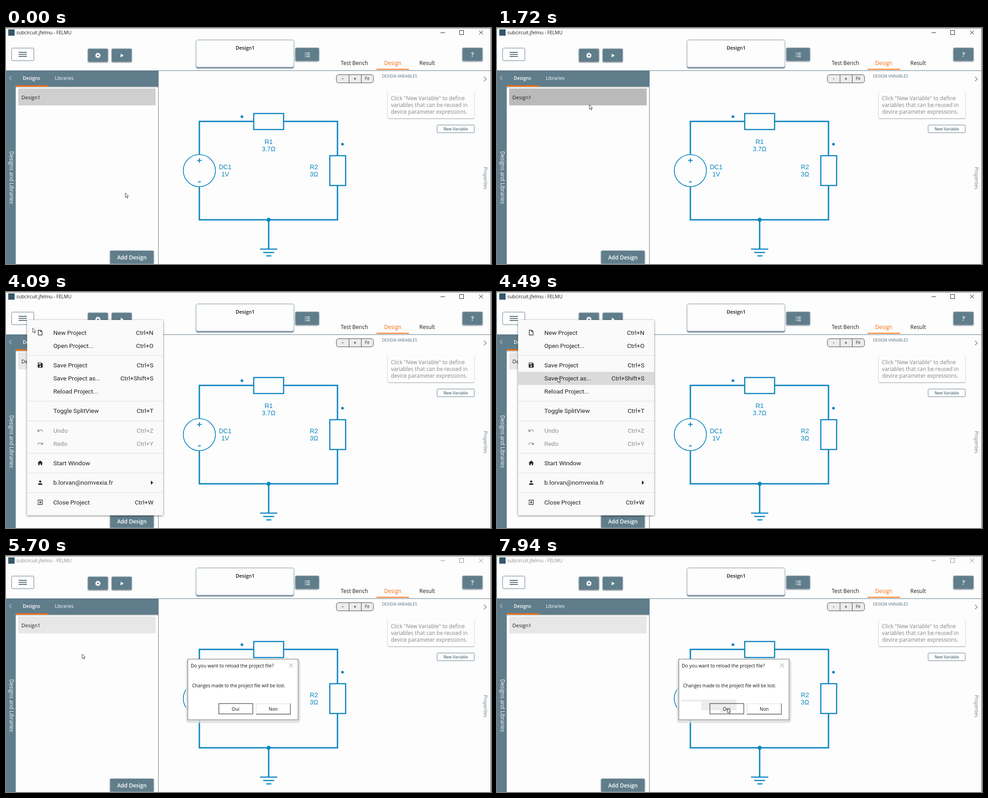
Recreate the animation shown at these times as an HTML page. Size 1071x523 px, loop 8 s.

```html
<!DOCTYPE html>
<html lang="en">
<head>
<meta charset="utf-8">
<title>Circuit editor</title>
<style>
html, body { margin: 0; width: 100%; height: 100%; overflow: hidden; background: #fdfdfd; }
svg { display: block; width: 1071px; height: 523px; }
text { font-family: "Open Sans", "Noto Sans", sans-serif; fill: #1c1c1c; white-space: pre; }
.mid { text-anchor: middle; }
.end { text-anchor: end; }
.semi { font-weight: 600; }
.med { font-weight: 500; }
.light { fill: #fff; }
.slate { fill: #607d8b; }
.raised { fill: #607d8b; stroke: #90a4ae; filter: drop-shadow(0 1px 1px #0007); }
.outline { fill: #fff; stroke: #607d8b; }
.wire { fill: none; stroke: #0a84c1; stroke-width: 3; }
.node { fill: #0a84c1; }
.label text { font: 14px "Liberation Sans", Arial, sans-serif; fill: #0a84c1; text-anchor: middle; }
.hint text { font-size: 11.9px; fill: #858585; }
#menu text { font: 13.6px Roboto, sans-serif; fill: #212121; }
#menu text.off { fill: #8f8f8f; }
#dialog text { fill: #111; }
#arrow, #hand { fill: #fff; stroke: #333; stroke-width: .9; stroke-linejoin: round; }
</style>
</head>
<body>
<svg viewBox="0 0 1071 523">
  <!-- title bar -->
  <rect x="5" y="3" width="14" height="14" fill="#34586b"/>
  <g id="title">
    <text x="23" y="14.2" font-size="10.3">subcircuit.jfelmu - FELMU</text>
    <path d="M959.5 10.5h10M1001.5 5.5h9v9h-9zM1044.5 5.5l9 9m0-9l-9 9" fill="none" stroke="#222"/>
  </g>

  <!-- toolbar -->
  <rect class="outline" x="12.5" y="44.5" width="49" height="28" rx="2"/>
  <rect id="hover" x="13" y="45" width="48" height="27" rx="2" fill="#e0e6e9"/>
  <path d="M28 54h18m-18 4.5h18m-18 4.5h18" stroke="#546e7a" stroke-width="2"/>
  <rect class="raised" x="181" y="46" width="44" height="29" rx="2"/>
  <rect class="raised" x="233.5" y="46" width="44" height="29" rx="2"/>
  <rect class="raised" x="639" y="44" width="52" height="29" rx="2"/>
  <rect class="raised" x="1008" y="44" width="44" height="29" rx="2"/>
  <g fill="none" stroke="#fff">
    <circle cx="203" cy="60.8" r="3.4" stroke-width="2.8"/>
    <circle cx="203" cy="60.8" r="5.3" stroke-width="1.8" pathLength="32" stroke-dasharray="2 2"/>
    <path d="M660 55.5h11m-11 4h11m-11 4h11" stroke-width="1.5" stroke-dasharray="2 1.5 7.5 0"/>
  </g>
  <path d="M253 57l7 4l-7 4z" fill="#fff"/>
  <text class="mid light semi" x="1030" y="64" font-size="14.5">?</text>
  <rect x="419.5" y="26.5" width="216.5" height="63" rx="4" fill="#90a4ae" stroke="#78909c"/>
  <rect x="420" y="27" width="215.5" height="59" rx="3" fill="#fdfdfd"/>
  <text class="mid semi" x="528" y="48" font-size="11">Design1</text>
  <text class="mid med" x="769.5" y="82" font-size="12">Test Bench</text>
  <text class="mid med" x="854" y="82" font-size="12" style="fill:#f26a0f">Design</text>
  <text class="mid med" x="930" y="82" font-size="12">Result</text>
  <path d="M818 91.5h72" stroke="#f26a0f" stroke-width="2"/>

  <!-- side panel -->
  <path d="M336 94.5H1071M336.5 94V523" stroke="#607d8b"/>
  <path d="M0 94H336.5V130H21.5V523H0z" class="slate"/>
  <rect x="21.5" y="130" width="315" height="2" opacity=".22"/>
  <rect x="21.5" y="127" width="71.5" height="3" fill="#f26a0f"/>
  <path d="M12 106.5l-4.5 4.5l4.5 4.5" fill="none" stroke="#a9bbc4" stroke-width="1.5"/>
  <text class="light semi" x="37" y="114.8" font-size="10.2">Designs</text>
  <text class="light med" x="108" y="114.8" font-size="10.3">Libraries</text>
  <rect id="row" x="27" y="134" width="303.5" height="37.5"/>
  <text x="34" y="157.5" font-size="11.2">Design1</text>
  <text class="light" font-size="11.7" transform="translate(7.5 273) rotate(90)">Designs and Libraries</text>
  <rect class="raised" x="230" y="493.5" width="96" height="29" rx="2"/>
  <text class="mid light semi" x="278" y="513" font-size="12">Add Design</text>

  <!-- circuit -->
  <g class="wire">
    <path d="M427 280V207H547M613 207H732V283M732 349V425H427V351M580 425V490"/>
    <path d="M547 189.5h66v35.5h-66zM715 283h35v66h-35z" stroke-width="2.6"/>
    <circle cx="427" cy="316" r="35.5" stroke-width="1.7"/>
    <path d="M422 293.5h10m-5-5v10M424 341h6" stroke-width="2"/>
    <path d="M561 490h38M568 497.5h24M575 505h11" stroke-width="2.5"/>
  </g>
  <g class="node">
    <circle cx="521" cy="196.5" r="3"/>
    <circle cx="743" cy="257.5" r="3"/>
    <circle cx="580" cy="425" r="4.5"/>
  </g>
  <g class="label">
    <text x="580" y="256.5">R1</text><text x="580" y="273">3.7Ω</text>
    <text x="484" y="313">DC1</text><text x="484" y="329">1V</text>
    <text x="680" y="313">R2</text><text x="680" y="329">3Ω</text>
  </g>

  <!-- zoom and properties -->
  <rect x="729.5" y="103.5" width="82" height="18" rx="5" fill="#ececec" stroke="#444"/>
  <path d="M757.5 103v18m27-18v18" stroke="#444"/>
  <text class="mid semi" x="743.5" y="115.5" font-size="10">-</text>
  <text class="mid semi" x="770.5" y="115.5" font-size="10">+</text>
  <text class="mid" x="797.5" y="115" font-size="9">Fit</text>
  <text class="med" x="830" y="109.6" font-size="8.8" style="fill:#546e7a">DESIGN VARIABLES</text>
  <path d="M1055.5 108l5 5l-5 5" fill="none" stroke="#78909c" stroke-width="1.6"/>
  <path d="M843 141v57q0 2 2 2h187q2 0 2-2v-57" fill="#fdfdfd" style="filter:drop-shadow(0 1px 1px #0006)"/>
  <g class="hint">
    <text x="850" y="160">Click "New Variable" to define</text>
    <text x="850" y="175">variables that can be reused in</text>
    <text x="850" y="190">device parameter expressions.</text>
  </g>
  <rect class="outline" x="952" y="215" width="82" height="17" rx="1.5"/>
  <text class="mid semi" x="993" y="226.5" font-size="8.5" style="fill:#546e7a">New Variable</text>
  <text font-size="10.3" transform="translate(1054.5 308) rotate(90)" style="fill:#607d8b">Properties</text>
  <path d="M0 .5H1071" stroke="#777"/>
  <path d="M1070.5 0V523" stroke="#444"/>

  <g id="menu">
    <rect x="46.5" y="62" width="300.5" height="433" rx="2" fill="#fafafa" style="filter:drop-shadow(0 1px 2px #0008)"/>
    <rect id="mark" x="47" width="300" height="29" fill="#dadada"/>
    <path d="M320 418l5 4.5l-5 4.5z" fill="#212121"/>
  </g>

  <g id="dialog">
    <rect x="397" y="229" width="253" height="141" rx="6" fill="#dedede" opacity=".8"/>
    <rect x="401.5" y="228.5" width="243.5" height="134.5" fill="#fff" stroke="#666"/>
    <g id="shade" fill="#ededed">
      <rect x="407" y="318" width="52" height="5"/>
      <rect x="451" y="318" width="78" height="24"/>
      <rect x="492" y="342" width="24" height="6"/>
    </g>
    <text x="408" y="246.5" font-size="10.35">Do you want to reload the project file?</text>
    <path d="M625 238l9 9m0-9l-9 9" stroke="#888"/>
    <text x="411" y="290.5" font-size="10">Changes made to the project file will be lost.</text>
    <rect x="470" y="327" width="75" height="23" fill="none" stroke="#555" stroke-width="1.4"/>
    <path d="M552.5 350v-22.5h75.5" fill="none" stroke="#d8d8d8"/>
    <path d="M552 350.5h76v-23.5" fill="none" stroke="#555" stroke-width="1.3"/>
    <text class="mid" x="507" y="342.5" font-size="10.2">Oui</text>
    <text class="mid" x="590" y="342.5" font-size="10.2">Non</text>
  </g>

  <g id="pointer">
    <path id="arrow" d="M0 0v10l2.3-2l1.7 3.6l1.6-.7l-1.6-3.5h3z"/>
    <path id="hand" d="M-1.5 1q1.5-2 3 0v4l4 1q2 .5 1.5 3l-1 4.500h-6l-4-5q0-2 2.500-.5z"/>
  </g>
</svg>

<script>
const LOOP = 8000, STEP = 125;
const $ = id => document.getElementById(id);

// 24-unit icon outlines
const ICONS = {
  file: "M4 2h10l6 6v14H4zM6 4v16h12V9h-5V4z",
  save: "M3 3h14l4 4v14H3zM5 5v4h10V5zM9 16a3 3 0 1 0 6 0a3 3 0 1 0-6 0z",
  undo: "M2 7v9h9l-3.6-3.6Q16 6 20 16l2.4-.8Q17 3 5.6 10.6z",
  home: "M10 20v-6h4v6h5v-8h3l-10-9l-10 9h3v8z",
  user: "M8 8a4 4 0 1 0 8 0a4 4 0 1 0-8 0zM4 20v-2q1-4 8-4t8 4v2z",
  exit: "M3 3h18v18H3v-6h2v4h14V5H5v4H3zM3 11h9.7L10 8.400l1.500-1.400l5 5l-5 5L10 15.600l2.700-2.600H3z"
};

// centre y, label, shortcut, icon
const ITEMS = [
  [90, "New Project", "Ctrl+N", "file"],
  [119, "Open Project...", "Ctrl+O"],
  [162, "Save Project", "Ctrl+S", "save"],
  [191, "Save Project as...", "Ctrl+Shift+S"],
  [220, "Reload Project...", ""],
  [263.5, "Toggle SplitView", "Ctrl+T"],
  [307, "Undo", "Ctrl+Z", "undo"],
  [336, "Redo", "Ctrl+Y", "redo"],
  [379, "Start Window", "", "home"],
  [422.5, "b.lorvan@nomvexia.fr", "", "user"],
  [466, "Close Project", "Ctrl+W", "exit"]
];

function icon(name, y) {
  const redo = name === "redo";
  const shape = ICONS[redo ? "undo" : name];
  return `<path fill="${shape === ICONS.undo ? "#8f8f8f" : "#212121"}" fill-rule="evenodd" d="${shape}"
    transform="translate(75.5 ${y}) scale(${redo ? -.6 : .6} .6) translate(-12 -12)"/>`;
}

$("menu").insertAdjacentHTML("beforeend", ITEMS.map(([y, label, keys, name], i) => {
  const off = /^(Un|Re)do$/.test(label) ? "off" : "";
  // a wider gap between rows holds a divider
  const gap = i && y - ITEMS[i - 1][0] > 40;
  return `<text class="${off}" x="104.5" y="${y + 4.8}">${label}</text>
    <text class="end ${off}" x="325.5" y="${y + 4.8}">${keys}</text>`
    + (name ? icon(name, y) : "")
    + (gap ? `<path d="M47 ${y - 21.5}h300" stroke="#dcdcdc"/>` : "");
}).join(""));

// Pointer path: time, x, y
const MOVES = [
  [0, 263.5, 365.5], [280, 262, 360.5], [430, 238, 317.5], [580, 330, 341],
  [940, 647, 201.5], [1090, 520, 151.5], [1210, 401, 270], [1330, 615, 381],
  [1720, 204, 170], [1990, 73, 143.5], [2260, 80, 150], [2740, 47, 131.5],
  [3010, 43.5, 71.5], [3160, 44, 58.5], [3600, 44, 58.5], [3700, 46, 60],
  [4090, 59, 79.5], [4210, 80, 126], [4610, 161, 222], [4760, 204, 224],
  [4910, 161, 218.5], [5060, 137, 217], [5180, 137, 217], [5420, 168, 217],
  [6100, 168, 217], [6350, 407.5, 283.5], [6500, 451.5, 311], [6650, 500, 329],
  [6770, 522, 310.5], [7040, 426, 253.5], [7190, 432, 270], [7550, 492.5, 332.5],
  [7700, 501, 338], [7940, 509, 337.5], [LOOP, 509, 337.5]
];
// Time, then the value held until the next step
const ROW = [[0, "#cfcfcf"], [1720, "#bababa"], [2880, "#cfcfcf"], [3440, "#e7e7e7"]];
const HOVER = [[0, 0], [3160, 1], [3700, .65], [3830, .3], [3950, 0]];
const MENU = [[0, 0], [3440, .6], [3560, 1], [5700, 0]];
const MARK = [[0, -99], [4210, 75.5], [4360, 148], [4480, 177], [4610, 206]];
const SHADE = [6500, 6650, 7700];

const at = (steps, t) => steps.findLast(s => s[0] <= t)[1];
const show = (el, on) => { el.style.visibility = on ? "visible" : "hidden"; };

// The pointer jumps along each leg in even steps
function pointer(t) {
  const i = MOVES.findIndex(m => m[0] > t);
  const [t0, x0, y0] = MOVES[i - 1], [t1, x1, y1] = MOVES[i];
  const n = Math.max(1, Math.round((t1 - t0) / STEP));
  const k = Math.floor((t - t0) / (t1 - t0) * n) / n;
  return `${x0 + (x1 - x0) * k} ${y0 + (y1 - y0) * k}`;
}

function draw(t) {
  $("pointer").setAttribute("transform", `translate(${pointer(t)})`);
  const hand = t >= 3160 && t < 3700;
  show($("hand"), hand);
  show($("arrow"), !hand);
  $("row").setAttribute("fill", at(ROW, t));
  $("hover").setAttribute("opacity", at(HOVER, t));
  $("menu").setAttribute("opacity", at(MENU, t));
  $("mark").setAttribute("y", at(MARK, t));
  const asking = t >= 5700;
  $("dialog").style.display = asking ? "" : "none";
  $("title").setAttribute("opacity", asking ? .5 : 1);
  SHADE.forEach((from, i) => show($("shade").children[i], asking && t >= from));
}

const start = performance.now();
function tick() {
  draw((performance.now() - start) % LOOP);
  requestAnimationFrame(tick);
}
draw(0);
requestAnimationFrame(tick);
</script>
</body>
</html>
```
